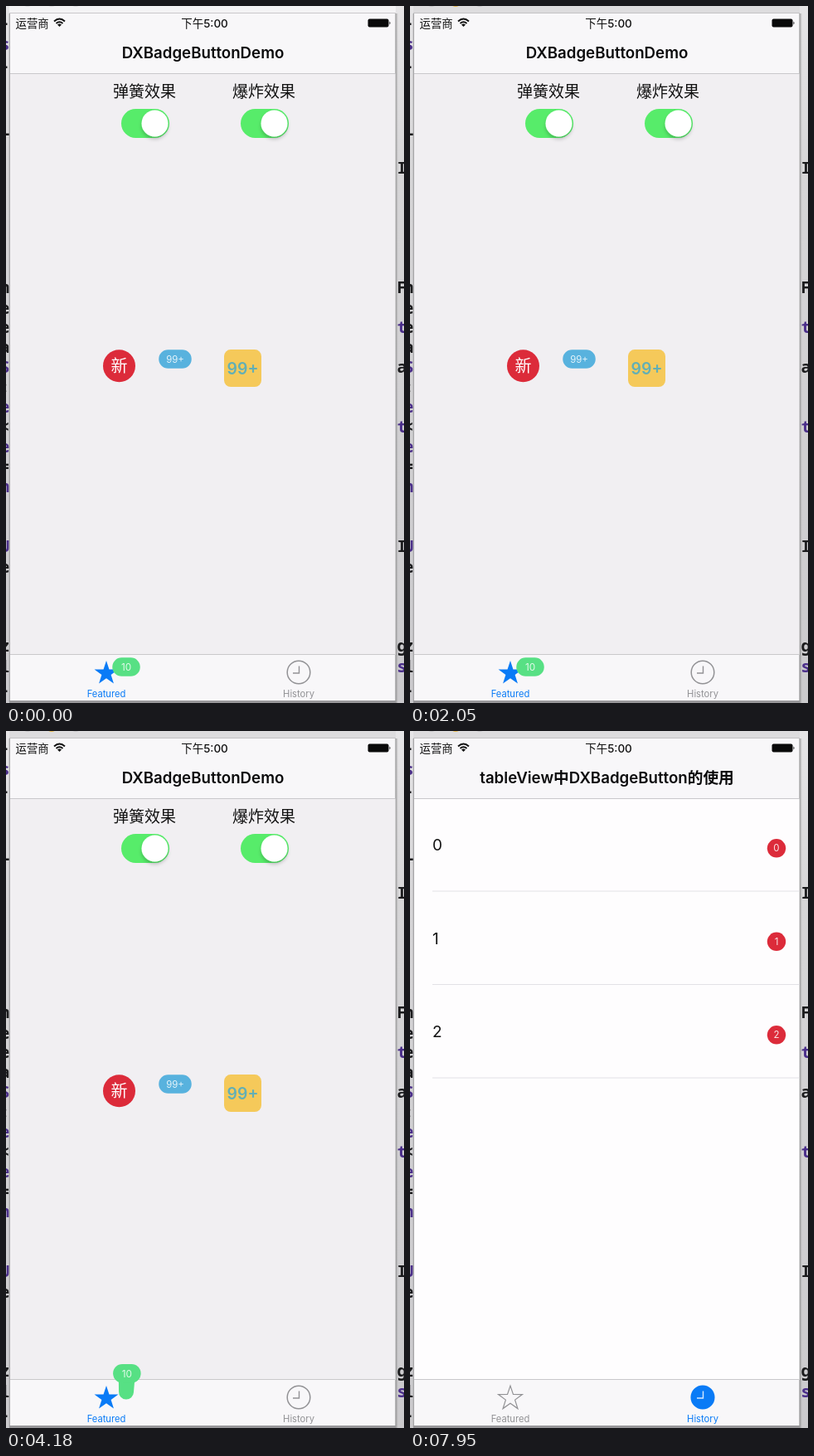
These frames come from a looping animation (480 px wide and 840 px high, 8000 ms). An HTML page:

```html
<!DOCTYPE html>
<html lang="zh">
<head>
<meta charset="utf-8">
<title>Badge button demo</title>
<style>
  html, body { margin: 0; width: 100%; height: 100%; overflow: hidden; background: #d3d2d4; }
  svg { display: block; width: 100%; height: 100%; }
  text { font-family: Inter, "Noto Sans CJK SC", "Noto Sans CJK", sans-serif; }
  .code text { font-family: "Noto Sans Mono", monospace; font-size: 20px; font-weight: 600; }
  .mid { text-anchor: middle; }
  .title { font-size: 18.7px; font-weight: 600; fill: #0b0b0c; }
</style>
</head>
<body>
<svg id="stage" viewBox="0 0 480 840">
  <defs>
    <linearGradient id="side" x1="0" y1="0" x2="0" y2="1">
      <stop offset="0" stop-color="#e6e5e7"/>
      <stop offset=".25" stop-color="#d6d5d7"/>
      <stop offset="1" stop-color="#cbcacd"/>
    </linearGradient>
    <linearGradient id="edge">
      <stop offset="0" stop-color="#666" stop-opacity=".85"/>
      <stop offset="1" stop-color="#999" stop-opacity="0"/>
    </linearGradient>
    <filter id="soft" x="-30%" y="-30%" width="160%" height="170%">
      <feDropShadow dx="0" dy="3" stdDeviation="2" flood-opacity=".22"/>
    </filter>
  </defs>

  <rect width="480" height="840" fill="url(#side)"/>
  <g class="code" id="code"></g>
  <rect x="469" y="9" width="4" height="831" fill="url(#edge)"/>
  <rect x="3.6" y="9" width="1.4" height="830" fill="#a9a8aa"/>
  <rect x="4" y="837" width="466" height="3" fill="#98979a"/>

  <rect id="bar" x="4" width="466" height="9"/>
  <g id="lights">
    <circle cx="26" cy="-6" r="7"/><circle cx="55" cy="-6" r="7"/><circle cx="84" cy="-6" r="7"/>
  </g>
  <path d="M4 8.6H470" stroke="#b9b8ba" stroke-width=".8"/>

  <rect x="5" y="9" width="464.5" height="828" fill="#f8f7f9"/>
  <rect id="page" x="5" y="82" width="464.5" height="700"/>
  <path d="M5 81.5H469.5M5 781.5H469.5" stroke="#c9c8cb"/>

  <text x="11.5" y="25.5" font-size="13.4" fill="#111">运营商</text>
  <g fill="none" stroke="#111" stroke-width="1.9">
    <path d="M58 18.5Q64.5 12.5 71 18.5M60.5 21Q64.5 17.5 68.5 21"/>
    <path d="M62 22.5Q64.5 20.5 67 22.5L64.5 25Z" fill="#111" stroke="none"/>
  </g>
  <text class="mid" x="239.5" y="25.5" font-size="13.5" font-weight="500" fill="#111">下午5:00</text>
  <rect x="436.5" y="15.5" width="25" height="10" rx="2" fill="#0a0a0a"/>
  <path d="M462.5 18.5q2 2 0 4z" fill="#0a0a0a"/>
  <text class="mid title" id="title" x="237.5" y="63.3"></text>

  <g id="demo">
    <g class="mid" font-size="19" fill="#111">
      <text x="167" y="109.5">弹簧效果</text>
      <text x="311" y="109.5">爆炸效果</text>
    </g>
    <g id="switches"></g>
  </g>
  <g id="table"></g>

  <path id="star" stroke-width="1.2"/>
  <circle id="clock" cx="353" cy="803" r="13.8" stroke-width="1.5"/>
  <path id="hands" d="M353.5 795.5V804H346" fill="none" stroke-width="1.4"/>
  <g class="mid" font-size="11.2">
    <text id="tab0" x="121" y="833">Featured</text>
    <text id="tab1" x="353" y="833">History</text>
  </g>
  <g id="badges"></g>
</svg>

<script>
const LOOP = 8000, SWITCH = 7000, FOCUS = 600, GONE = 5900;
const PERIOD = 120, DAMPING = 0.204, SNAP = 85;
const BLUE = '#0a7bf6', GREY = '#929295', RED = '#dc2b3a';
const $ = id => document.getElementById(id);

function add(parent, tag, attrs, text) {
  const el = document.createElementNS('http://www.w3.org/2000/svg', tag);
  for (const k in attrs) el.setAttribute(k, attrs[k]);
  if (text !== undefined) el.textContent = text;
  return parent.appendChild(el);
}
function set(id, attrs) {
  for (const k in attrs) $(id).setAttribute(k, attrs[k]);
}

// Slivers of an editor window behind the phone: [baseline, glyph, purple]
const left = [[27, '-'], [53, 's', 1], [79, '-'], [160, '—'], [346, 'n'], [371, 'e'], [394, 'e'],
  [418, 'a'], [442, 'S', 1], [466, ':'], [490, 'e', 1], [514, '<'], [538, 'e', 1], [562, '='],
  [586, 'n', 1], [658, 'U', 1], [683, 'e'], [778, 'z'], [803, 'l'], [831, '-']];
const right = [[202, 'I'], [346, 'F'], [394, 't', 1], [442, 'a'], [514, 't', 1], [658, 'I'],
  [778, 'g'], [803, 's', 1]];
const glyph = (x, anchor) => ([y, ch, purple]) =>
  add($('code'), 'text', { x, y, 'text-anchor': anchor, fill: purple ? '#4b2f8a' : '#1b1b1d' }, ch);
left.forEach(glyph(4.5, 'end'));
right.forEach(glyph(471.5, 'start'));

for (const x of [139, 283]) {
  add($('switches'), 'rect', { x, y: 124, width: 58, height: 35, rx: 17.5, fill: '#57ec6a' });
  add($('switches'), 'circle', { cx: x + 40.5, cy: 141.5, r: 16, fill: '#fff', filter: 'url(#soft)' });
}

for (let i = 0; i < 3; i++) {
  const y = i * 112.5, t = $('table');
  add(t, 'text', { x: 27, y: 144.2 + y, 'font-size': 19, fill: '#111' }, i);
  add(t, 'circle', { cx: 442, cy: 141.3 + y, r: 11.2, fill: RED });
  add(t, 'text', { x: 442, y: 145.4 + y, class: 'mid', 'font-size': 11.5, fill: '#fbe4e6' }, i);
  add(t, 'path', { d: `M27 ${193 + y}H469.5`, stroke: '#e2e1e6' });
}

let star = '';
for (let i = 0; i < 10; i++) {
  const a = i * Math.PI / 5, r = i % 2 ? 5.9 : 15.2;
  star += `${i ? 'L' : 'M'}${121 + r * Math.sin(a)} ${804.3 - r * Math.cos(a)}`;
}
set('star', { d: star + 'Z' });

// A drag pulls toward (dx, dy) for `rise` ms, holds, and springs home at `end`
const badges = [
  { x: 136.5, y: 433.7, w: 39, h: 39, r: 19.5, fill: RED, label: '新', size: 20, ink: '#fff', base: 7.4,
    drags: [{ start: 700, rise: 400, end: 1470, dx: -5.5, dy: 80 }] },
  { x: 204, y: 425.5, w: 39.5, h: 22.5, r: 11.2, fill: '#58b2de', label: '99+', size: 11.4, ink: '#e4f3fa', base: 4.1,
    drags: [{ start: 2480, rise: 348, end: 3200, dx: -2.5, dy: 72 }] },
  { x: 285.5, y: 436.6, w: 45, h: 45, r: 8, fill: '#f5c95a', label: '99+', size: 19.4, ink: '#62afb5', base: 7, bold: 1,
    drags: [] },
  { x: 145, y: 796.6, w: 33.5, h: 22.5, r: 11.2, fill: '#57e084', label: '10', size: 11.8, ink: '#e2faea', base: 4.3, until: GONE,
    drags: [{ start: 4000, rise: 400, end: 4670, dx: 2, dy: -52 },
            { start: 5150, rise: 500, end: GONE, dx: 10, dy: -130 }] }
];
for (const b of badges) {
  b.group = add($('badges'), 'g', {});
  b.tail = add(b.group, 'path', { fill: b.fill });
  b.body = add(b.group, 'g', {});
  add(b.body, 'rect', { x: -b.w / 2, y: -b.h / 2, width: b.w, height: b.h, rx: b.r, fill: b.fill });
  add(b.body, 'text', { class: 'mid', y: b.base, 'font-size': b.size, fill: b.ink,
    'font-weight': b.bold ? 600 : 400 }, b.label);
}

const smooth = u => u * u * (3 - 2 * u);

function pull(drag, t) {
  if (t < drag.end) return smooth(Math.min(1, (t - drag.start) / drag.rise));
  const a = (t - drag.end) / PERIOD * 2 * Math.PI;
  return a > 36 ? 0 : Math.exp(-DAMPING * a) * Math.cos(a);
}

// Sticky bridge from a shrinking circle at home to the dragged badge
function bridge(b, dx, dy) {
  const d = Math.hypot(dx, dy);
  if (d < 0.5 || d > SNAP) return '';
  const big = b.r, small = Math.max(2, b.r - d / 10);
  const nx = -dy / d, ny = dx / d, mx = b.x + dx / 2, my = b.y + dy / 2;
  const at = (x, y, r) => `${x + nx * r} ${y + ny * r}`;
  const ex = b.x + dx, ey = b.y + dy;
  return `M${at(b.x, b.y, small)}Q${at(mx, my, small)} ${at(ex, ey, big)}` +
    `L${at(ex, ey, -big)}Q${at(mx, my, -small)} ${at(b.x, b.y, -small)}` +
    `A${small} ${small} 0 0 0 ${at(b.x, b.y, small)}Z`;
}

function drawBadge(b, t) {
  const shown = b.until ? t < b.until : t < SWITCH;
  b.group.style.display = shown ? '' : 'none';
  if (!shown) return;
  const drag = b.drags.filter(g => t >= g.start).pop();
  const k = drag ? pull(drag, t) : 0;
  const dx = drag ? drag.dx * k : 0, dy = drag ? drag.dy * k : 0;
  b.body.setAttribute('transform', `translate(${b.x + dx} ${b.y + dy})`);
  b.tail.setAttribute('d', drag && t < drag.end ? bridge(b, dx, dy) : '');
}

function draw(t) {
  const second = t >= SWITCH, active = t >= FOCUS;
  set('bar', { fill: active ? '#dddcde' : '#f4f3f5' });
  const lights = $('lights').children;
  for (let i = 0; i < 3; i++)
    lights[i].setAttribute('fill', active && i === 1 ? '#e8b84a' : active ? '#c6c5c7' : '#dfdee0');

  $('title').textContent = second ? 'tableView中DXBadgeButton的使用' : 'DXBadgeButtonDemo';
  set('page', { fill: second ? '#fefdfe' : '#f1eff2' });
  $('demo').style.display = second ? 'none' : '';
  $('table').style.display = second ? '' : 'none';

  set('star', { fill: second ? 'none' : BLUE, stroke: second ? GREY : 'none' });
  set('clock', { fill: second ? BLUE : 'none', stroke: second ? BLUE : GREY });
  set('hands', { stroke: second ? '#d5e8ff' : GREY });
  set('tab0', { fill: second ? GREY : BLUE });
  set('tab1', { fill: second ? BLUE : GREY });
  badges.forEach(b => drawBadge(b, t));
}

const begin = performance.now();
function tick() {
  draw((performance.now() - begin) % LOOP);
  requestAnimationFrame(tick);
}
draw(0);
requestAnimationFrame(tick);
</script>
</body>
</html>
```
